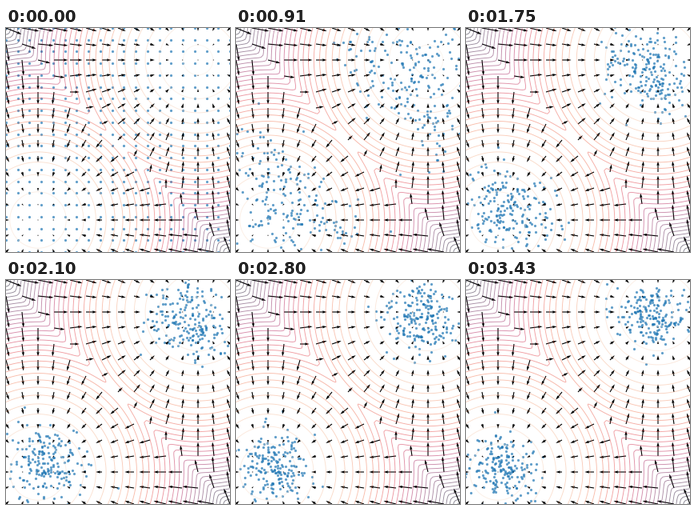
These frames come from a looping animation (280 px wide and 280 px high, 3.5 s). A matplotlib script:

```python
import numpy as np
import matplotlib.pyplot as plt
from matplotlib.animation import FuncAnimation
from matplotlib.colors import LinearSegmentedColormap

SIZE, DPI = 280, 100
FRAMES, INTERVAL = 50, 70
LIMIT = 7
STEP = 0.05
MEANS = np.array([[-5.0, -5.0], [5.0, 5.0]])
WEIGHTS = np.array([0.2, 0.8])
ROCKET = LinearSegmentedColormap.from_list("rocket", [
    "#03051a", "#35193e", "#701f57", "#ad1759",
    "#e13342", "#f37651", "#f6b48f", "#faebdd"])


def px(width):
    """Convert pixels to points."""
    return width * 72 / DPI


def mesh(count):
    axis = np.linspace(-LIMIT, LIMIT, count)
    return np.stack(np.meshgrid(axis, axis), axis=-1)


def components(points):
    offsets = MEANS - points[..., None, :]
    logs = np.log(WEIGHTS / (2 * np.pi)) - 0.5 * (offsets ** 2).sum(-1)
    return offsets, logs


def log_density(points):
    return np.logaddexp.reduce(components(points)[1], axis=-1)


def score(points):
    offsets, logs = components(points)
    shares = np.exp(logs - np.logaddexp.reduce(logs, axis=-1)[..., None])
    return (shares[..., None] * offsets).sum(-2)


def langevin():
    """Sample paths from a regular grid towards the two modes."""
    rng = np.random.default_rng(4)
    points = mesh(20).reshape(-1, 2)
    path = [points]
    for _ in range(FRAMES - 1):
        noise = rng.standard_normal(points.shape)
        points = points + STEP * score(points) + np.sqrt(2 * STEP) * noise
        path.append(points)
    return path


fig = plt.figure(figsize=(SIZE / DPI, SIZE / DPI), dpi=DPI, facecolor="white")
ax = fig.add_axes([0, 0, 1, 1])
ax.axis("off")

fine = mesh(100)
ax.contour(fine[..., 0], fine[..., 1], log_density(fine),
           levels=np.arange(-75, 0, 2.5), cmap=ROCKET, alpha=0.5,
           linewidths=px(0.9), linestyles="solid")

path = langevin()
dots = ax.scatter(*path[0].T, s=px(3.2) ** 2, color="C0", alpha=0.7,
                  linewidths=0)

coarse = mesh(15)
arrows = score(coarse)
ax.quiver(coarse[..., 0], coarse[..., 1], arrows[..., 0], arrows[..., 1],
          width=0.004)
ax.set(xlim=(-LIMIT, LIMIT), ylim=(-LIMIT, LIMIT))


def update(frame):
    dots.set_offsets(path[frame])
    return (dots,)


anim = FuncAnimation(fig, update, frames=FRAMES, interval=INTERVAL,
                     repeat=True, repeat_delay=0)
plt.show()
```
